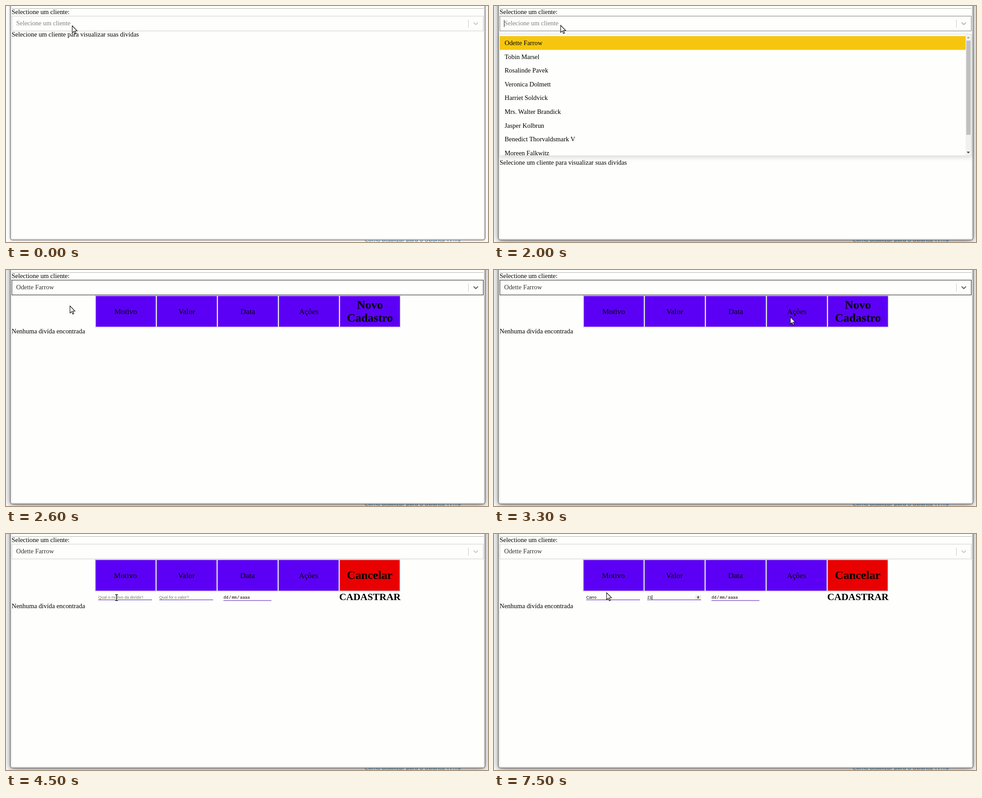
Recreate the animation shown at these times as an HTML page. Size 1066 px wide and 525 px high, loop 8 s.

```html
<!DOCTYPE html>
<html lang="pt-BR">
<head>
<meta charset="utf-8">
<title>Cadastro de dívidas</title>
<style>
  html, body { margin: 0; width: 100%; height: 100%; overflow: hidden; background: #fff; }
  #desk { position: relative; width: 100%; height: 100%; overflow: hidden; contain: strict; }
  #news { position: absolute; left: 793px; top: 511px; font: 12.6px/17px "Open Sans", sans-serif; color: #2f86c6; white-space: pre; }
  #win { position: absolute; left: 9px; top: -40px; width: 1049px; height: 559px; border: 1px solid #444; border-radius: 0 0 5px 5px; background: #f1f1f0; box-shadow: 0 1px 10px rgba(0,0,0,.2); }
  #win.on { box-shadow: 0 3px 16px rgba(0,0,0,.5); }
  svg { position: absolute; left: 0; top: 0; }
  text { font: 14.4px "Liberation Serif", serif; white-space: pre; }
  .head text { font-size: 17.28px; text-anchor: middle; }
  .head .big { font-size: 25.92px; font-weight: bold; }
  .in text { font: 9px "Liberation Sans", sans-serif; }
  .in .hint { fill: #757575; }
  .in .date { font: 9px "DejaVu Sans Mono", monospace; }
  .in .submit { font: bold 21.6px "Liberation Serif", serif; }
  .menu { filter: drop-shadow(0 4px 5px rgba(0,0,0,.13)); }
</style>
</head>
<body>
<div id="desk">
  <div id="news">Como atualizar para o Ubuntu 17.10</div>
  <div id="win"></div>
  <svg id="stage" width="1066" height="525" viewBox="0 0 1066 525"></svg>
</div>
<script>
const LOOP = 8000;
const names = ["Odette Farrow", "Tobin Marsel", "Rosalinde Pavek", "Veronica Dolmett",
  "Harriet Soldvick", "Mrs. Walter Brandick", "Jasper Kolbrun", "Benedict Thorvaldsmark V", "Moreen Falkwitz"];

const text = (x, y, s, attrs = "") => `<text x="${x}" y="${y}" ${attrs}>${s}</text>`;
const rect = (x, y, w, h, fill, attrs = "") =>
  `<rect x="${x}" y="${y}" width="${w}" height="${h}" fill="${fill}" ${attrs}/>`;

function page() {
  return rect(12, -5, 1045, 523, "#fefefc", 'stroke="#d4d4d2"') +
    rect(13, 5, 1043, 1, "#b0b0b0") + text(12.6, 18, "Selectione um cliente:");
}

function select(s) {
  const label = s.picked ? text(22.5, 43, names[0], 'fill="#333"')
    : text(22.5, 43, "Selecione um cliente", 'fill="#808080"');
  return rect(13, 22.5, 1042.5, 33, "#fefefc", `stroke="${s.border}"`) + label +
    (s.selectCaret ? rect(22, 31, 1, 16, "#222") : "") +
    rect(1022, 30, 1, 18, "#ccc") +
    `<path d="M1034.7 37.2l4.3 4.2 4.3-4.2" fill="none" stroke="${s.chevron}" stroke-width="2.2" stroke-linecap="round" stroke-linejoin="round"/>`;
}

function menu() {
  const items = names.map((n, i) => text(23.5, 87 + 30.6 * i, n)).join("");
  return `<g class="menu">${rect(12.5, 62.5, 1043, 270.5, "#fefefc", 'stroke="#dededd"')}</g>` +
    rect(13, 67, 1030, 30.5, "#f6c60f") +
    `<svg width="1043" height="332.5">${items}</svg>` +
    rect(1043, 63, 12, 269.5, "#f1f1f0") + rect(1044.5, 77, 9.5, 209.5, "#c0c0bf") +
    '<path d="M1045.5 72l3.5-4 3.5 4z" fill="#a3a3a3"/><path d="M1045.5 324l3.5 4 3.5-4z" fill="#444"/>';
}

function header(open) {
  const x0 = open ? 197 : 197.6, pitch = 135;
  let out = rect(x0 - .4, 56.3, 675.2, 71.4, "#cfc9d8");
  ["Motivo", "Valor", "Data", "Ações", ""].forEach((label, i) => {
    const x = x0 + pitch * i;
    if (i) out += rect(x - .5, 57, 1, 70, "#f1eef6");
    out += rect(x + 1.3, 58, 132.2, 68, open && i == 4 ? "#e90000" : "#5c00f5");
    out += text(x + 67, 97.5, label);
  });
  const mid = x0 + pitch * 4 + 67.3;
  out += open ? text(mid, 100, "Cancelar", 'class="big"')
    : text(mid, 86, "Novo", 'class="big"') + text(mid, 115, "Cadastro", 'class="big"');
  return `<g class="head">${out}</g>`;
}

function field(x, value, hint, caretAt) {
  return rect(x, 146, 119, 1, "#4c0ab8") +
    (value ? text(x, 144, value) : text(x, 144, hint, 'class="hint"')) +
    (caretAt == null ? "" : rect(x + caretAt, 136, 1, 10, "#000"));
}

// Caret offset follows the advance widths of the 9px sans face.
const advance = { C: .722, a: .556, r: .333, o: .556, 1: .556, 2: .556 };
const widthOf = s => Math.round([...s].reduce((w, c) => w + advance[c] * 9, 0));

function form(s) {
  const caret = (name, value) => s.caret == name ? widthOf(value) : null;
  const spinner = s.spinner ? rect(445, 136, 13, 10, "#ececec") +
    '<path d="M449 140.5l2.5-2.7 2.5 2.7zM449 141.3l2.5 2.7 2.5-2.7z" fill="#333"/>' : "";
  return `<g class="in">${field(204, s.reason, "Qual o motivo da divída?", caret("reason", s.reason))}
    ${spinner}${field(339, s.value, "Qual foi o valor?", caret("value", s.value))}
    <text class="date" x="481" y="144">dd<tspan dx="1">/</tspan><tspan dx="1">mm</tspan><tspan dx="1">/</tspan><tspan dx="1">aaaa</tspan></text>
    ${rect(481, 147.5, 106, 1, "#4c0ab8")}${text(737, 147, "CADASTRAR", 'class="submit"')}</g>`;
}

function pointer([x, y, beam]) {
  const d = "M-3-6.5h2.3L0-6l.7-.5H3M0-6V6M-3 6.5h2.3L0 6l.7.5H3";
  return `<g transform="translate(${x} ${y})">` + (beam
    ? `<path d="${d}" fill="none" stroke="#fff" stroke-width="3"/><path d="${d}" fill="none" stroke="#000" stroke-width="1.3"/>`
    : '<path d="M.5.5v15.8l3.6-3.4 2.6 5.7 2.4-1.1-2.6-5.5h5z" fill="#fff" stroke="#111" stroke-width="1.2"/>') + "</g>";
}

// Each step changes only the listed parts of the state.
const steps = [
  [0, { border: "#ccc", chevron: "#ccc", view: "empty", at: [146, 43.5], reason: "", value: "" }],
  [100, { border: "#aaa" }],
  [1700, { at: [147, 42.5] }],
  [1900, { active: true }],
  [2000, { border: "#777", chevron: "#bbb", view: "menu", selectCaret: true }],
  [2100, { border: "#111", chevron: "#666" }],
  [2300, { at: [144, 62] }],
  [2400, { at: [141, 79.5] }],
  [2600, { view: "table", picked: true, selectCaret: false }],
  [2900, { at: [162, 84] }],
  [3000, { at: [255, 95] }],
  [3100, { at: [390, 103] }],
  [3200, { at: [530, 106] }],
  [3300, { at: [655, 104] }],
  [3400, { at: [755, 97] }],
  [3500, { at: [810, 90, true] }],
  [3600, { at: [825, 78] }],
  [3700, { at: [795, 72, true] }],
  [3800, { at: [791, 71.5, true], border: "#666", chevron: "#888" }],
  [3900, { border: "#b5b5b5", chevron: "#b5b5b5" }],
  [4000, { border: "#ccc", chevron: "#ccc", view: "form" }],
  [4100, { at: [755, 78] }],
  [4200, { at: [610, 100] }],
  [4300, { at: [420, 125] }],
  [4400, { at: [285, 138, true] }],
  [4500, { at: [244.5, 141.5, true] }],
  [4700, { caret: "reason" }],
  [4900, { at: [248.5, 130] }],
  [5200, { reason: "C" }],
  [5400, { reason: "Ca" }],
  [5700, { reason: "Car" }],
  [5900, { reason: "Carr" }],
  [6000, { reason: "Carro" }],
  [6100, { caret: "value", spinner: true }],
  [6700, { caret: "" }],
  [7400, { caret: "value", value: "2" }],
  [7500, { value: "21" }]
];

const stage = document.getElementById("stage"), win = document.getElementById("win");
const views = {
  empty: () => text(12.6, 68, "Selecione um cliente para visualizar suas divídas"),
  menu: () => menu() + text(12.6, 353, "Selecione um cliente para visualizar suas divídas"),
  table: () => header(false) + text(12.6, 140.5, "Nenhuma divída encontrada"),
  form: s => header(true) + form(s) + text(12.6, 165, "Nenhuma divída encontrada")
};

let shown = 0;
function draw(now) {
  const t = now % LOOP;
  const count = steps.filter(([at]) => at <= t).length;
  if (count != shown) {
    shown = count;
    const s = Object.assign({}, ...steps.slice(0, count).map(step => step[1]));
    win.classList.toggle("on", !!s.active);
    stage.innerHTML = page() + select(s) + views[s.view](s) + pointer(s.at);
  }
}

const start = performance.now();
function tick() {
  draw(performance.now() - start);
  requestAnimationFrame(tick);
}
tick();
</script>
</body>
</html>
```
